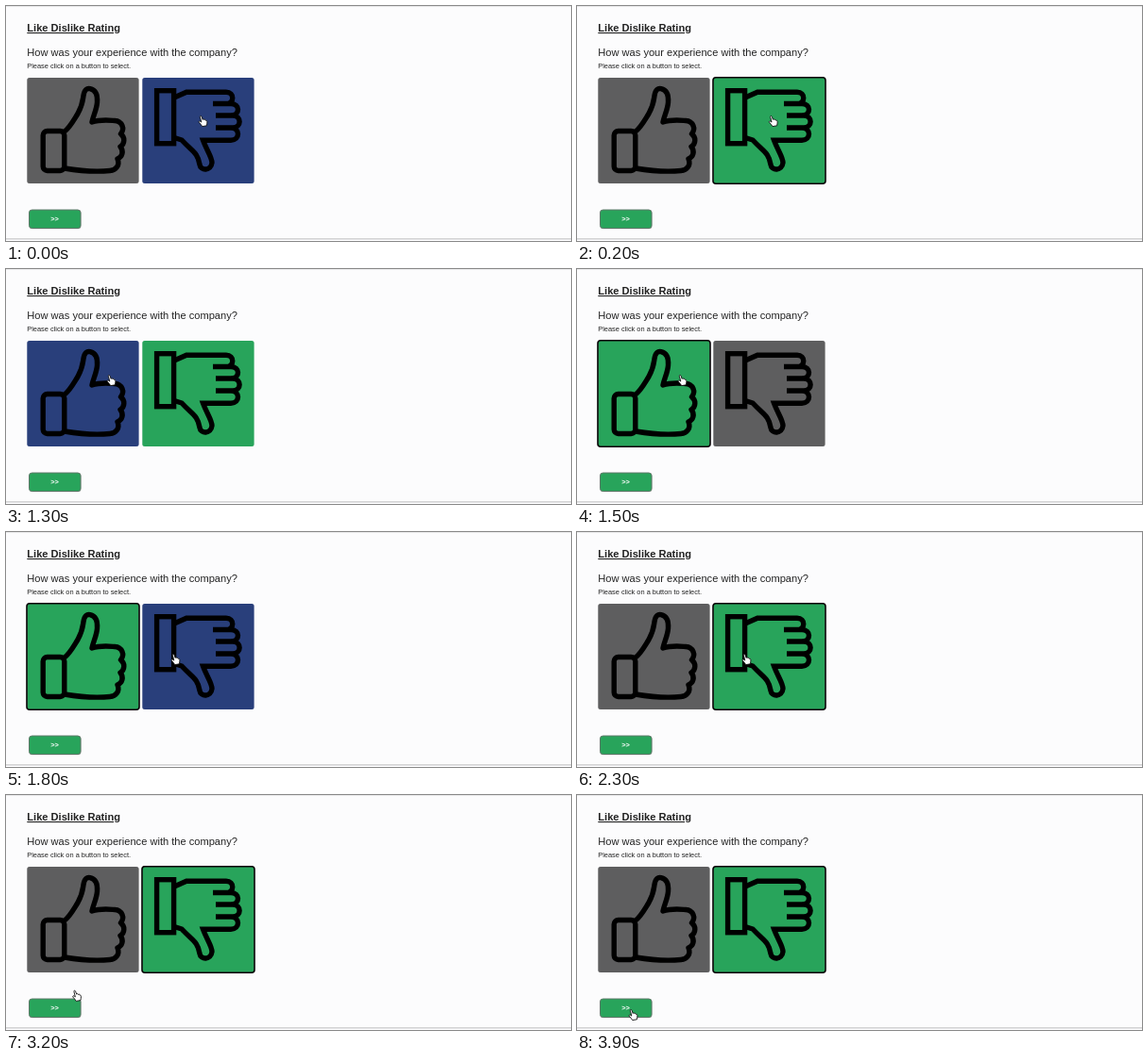
These frames come from a looping animation (598x249 px, 4000 ms). An HTML page:

```html
<!DOCTYPE html>
<html lang="en">
<head>
<meta charset="utf-8">
<title>Like Dislike Rating</title>
<style>
  html, body { margin: 0; width: 100%; height: 100%; overflow: hidden; background: #fcfcfd; }
  svg { display: block; }
  text { font-family: "Liberation Sans", Arial, sans-serif; fill: #222; }
  .icon { fill: none; stroke: #000; stroke-width: 5.4; }
  .ring { fill: none; stroke: #000; stroke-width: 1.6; }
</style>
</head>
<body>
<svg width="598" height="249" viewBox="0 0 598 249">
  <rect width="598" height="1" fill="#e6e6e7"/>
  <rect y="246" width="598" height="1.5" fill="#d2d2d3"/>

  <text x="22.3" y="27" font-size="11.1" font-weight="bold" text-decoration="underline">Like Dislike Rating</text>
  <text x="22.3" y="53" font-size="11.1">How was your experience with the company?</text>
  <text x="22.3" y="65.6" font-size="7.4">Please click on a button to select.</text>

  <rect id="like" x="22.3" y="76" width="118.3" height="112" rx="2.5"/>
  <rect id="likeRing" class="ring" x="22" y="75.7" width="119" height="112.6" rx="3"/>
  <g class="icon" stroke-linejoin="round">
    <rect x="39.2" y="132.5" width="22.6" height="42" rx="4.5"/>
    <path d="M62 133C68 128 71 122 76 114C81 105 81 102 82 95C83 88 86 87 89 87.7C95 89 97 95 96.5 102
      C96 110 92 117 91 123C100 120 108 121 115 121.5C123 122 126 130 121.5 135.5C126 139 126 146 121 149
      C125 154 123 160 118 162C121 169 116 174 110 174.5C95 176 80 175 62 172"/>
  </g>

  <rect id="dislike" x="144.3" y="76" width="118.3" height="112" rx="2.5"/>
  <rect id="dislikeRing" class="ring" x="144" y="75.7" width="119" height="112.6" rx="3"/>
  <g class="icon">
    <rect x="159.6" y="89.7" width="18" height="56"/>
    <path d="M178 97L191 91.3H233C242 91.3 242 103.5 233 103.5H219M233 103.5H238C248 103.5 248 116 238 116H222
      M238 116H240C249.5 116 249.5 129 240 129H222M238 129C248 129 248 142.2 238 142.2H208.5
      C212 152 218 160 218 166C217 175 206 175 205 168C203 155 197 154 186 142L178 139.5"/>
  </g>

  <rect x="24.5" y="216.3" width="55" height="20" rx="3" fill="#bbb"/>
  <rect x="24.5" y="216" width="54.5" height="19.5" rx="3" fill="#28a45b" stroke="#5d7868"/>
  <text x="51.6" y="228.2" font-size="7.4" font-weight="bold" text-anchor="middle" style="fill:#fff">&gt;&gt;</text>

  <path id="hand" fill="#fff" stroke="#111" stroke-width=".9" stroke-linejoin="round"
    d="M-2.6-4.3C-3.2-5.6-1.5-6-1-4.8L.2-1.6C.6-2.6 1.8-2.3 2-1.3C2.6-2 3.5-1.5 3.6-.6
      C4.4-1 4.9-.1 4.9.8C5 2.4 4.5 3.2 4.4 4.8L-.3 5.6C-1 4-2.6 2.8-3.7 1.3C-4.4.2-3.1-.4-2.3.3L-1.2 1.1Z"/>
</svg>
<script>
  const LOOP = 4000, STEP = 100;
  const GRAY = "#5e5e5f", BLUE = "#293f7b", GREEN = "#28a45b";

  // [time, x, y] of the pointer
  const route = [
    [0, 208, 122], [300, 207, 122], [700, 144, 118], [1000, 111, 118], [1600, 111, 118],
    [1800, 179, 135], [2300, 179, 135], [2700, 122, 153], [2800, 119, 155],
    [3400, 59, 233], [4000, 59, 233]
  ];
  // [time, like colour, dislike colour, focused tile]
  const states = [
    [0, GRAY, BLUE, ""], [200, GRAY, GREEN, "dislike"], [800, BLUE, GREEN, "dislike"],
    [1300, BLUE, GREEN, ""], [1400, GREEN, GRAY, "like"], [1800, GREEN, BLUE, "like"],
    [2100, GREEN, BLUE, ""], [2200, GRAY, GREEN, "dislike"], [2600, BLUE, GREEN, "dislike"],
    [3100, GRAY, GREEN, "dislike"]
  ];
  const $ = id => document.getElementById(id);
  const ease = p => p * p * (3 - 2 * p);

  function pointerAt(t) {
    const i = route.findIndex(stop => stop[0] > t);
    const [t0, x0, y0] = route[i - 1], [t1, x1, y1] = route[i];
    const p = ease((t - t0) / (t1 - t0));
    return [x0 + (x1 - x0) * p, y0 + (y1 - y0) * p];
  }

  function draw(now) {
    const t = Math.floor(now % LOOP / STEP) * STEP;
    const [, like, dislike, focus] = states.filter(s => s[0] <= t).pop();
    $("like").setAttribute("fill", like);
    $("dislike").setAttribute("fill", dislike);
    for (const id of ["like", "dislike"])
      $(id + "Ring").style.display = focus === id ? "" : "none";
    $("hand").setAttribute("transform", `translate(${pointerAt(t)})`);
    requestAnimationFrame(() => draw(performance.now() - start));
  }

  const start = performance.now();
  draw(0);
</script>
</body>
</html>
```
